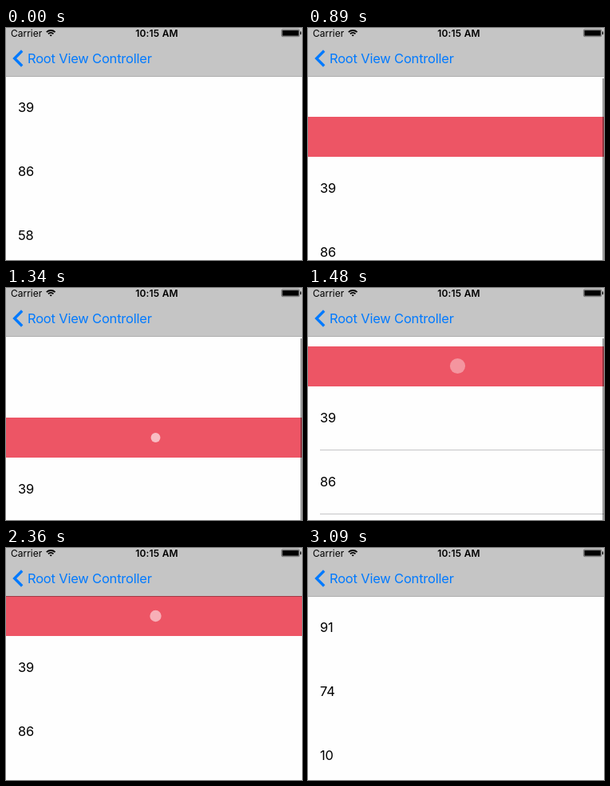
Recreate the animation shown at these times as an HTML page with a canvas. Size 371 px wide and 290 px high, loop 3350 ms.

```html
<!DOCTYPE html>
<html lang="en">
<head>
<meta charset="utf-8">
<title>Pull to refresh</title>
<style>
  html, body { margin: 0; width: 100%; height: 100%; overflow: hidden; background: #fefefe; }
  canvas { display: block; }
</style>
</head>
<body>
<canvas id="stage" width="371" height="290"></canvas>
<script>
const ctx = document.getElementById('stage').getContext('2d');
const LOOP = 3350, STEP = 147.6, LEAD = 10;
const WIDTH = 371, HEIGHT = 290, NAV = 60, ROW = 80, HEADER = 50;
const FONT = 'Inter, Roboto, sans-serif';
const BLUE = '#007aff';

// All times below count steps of the animation clock.
const RELEASE = 9, RELOAD = 19, MAX_PULL = 152;

const clamp = (x, min, max) => Math.min(Math.max(x, min), max);
const ease = p => (1 - Math.cos(Math.PI * clamp(p, 0, 1))) / 2;

// Distance the list is pulled down: steady drag with soft ends, spring to the header, close.
function pullAt(step) {
  if (step < RELEASE) {
    const finger = 50 * (step - 4) + 1;
    return (clamp(finger - 6, 0, MAX_PULL) + clamp(finger + 6, 0, MAX_PULL)) / 2;
  }
  if (step < RELOAD) {
    return HEADER + (MAX_PULL - HEADER) * Math.exp(-2.0975 * (step - RELEASE) ** 1.5);
  }
  return HEADER * (1 - ease((step - 18.86) / 2.23));
}

function rect(color, x, y, w, h) {
  ctx.fillStyle = color;
  ctx.fillRect(x, y, w, h);
}

function polyline(...points) {
  ctx.beginPath();
  points.forEach(([x, y]) => ctx.lineTo(x, y));
}

function text(str, x, y, { size = 16.5, weight = 400, color = '#000', spacing = -0.2, align = 'left' } = {}) {
  ctx.font = `${weight} ${size}px ${FONT}`;
  ctx.letterSpacing = spacing + 'px';
  ctx.textAlign = align;
  ctx.fillStyle = color;
  ctx.fillText(str, x, y);
}

function drawList(pull, numbers) {
  // Hairlines are only seen when they fall on a whole pixel.
  const showLines = pull % 1 === 0.5;
  numbers.forEach((number, i) => {
    const top = NAV + pull + i * ROW;
    text(number, 15, Math.round(top + 45));
    if (showLines) rect('#c4c4c6', 15, Math.floor(top + ROW), WIDTH - 15, 1);
  });
}

function drawHeader(pull, step) {
  if (pull === 0) return;
  rect('#ed5565', 0, Math.round(NAV + pull) - HEADER, WIDTH, HEADER);
  if (step >= RELEASE && step < RELOAD) drawPulse(NAV + pull - HEADER / 2, step);
}

// A dot that grows while it fades, over and over.
function drawPulse(y, step) {
  const size = ease(((step - 6.27) % 6.67) / 6.1);
  if (size > 0.95) return;
  ctx.fillStyle = `rgba(255,255,255,${1 - 0.93 * size})`;
  ctx.beginPath();
  ctx.arc(187.5, y, 14.25 * size, 0, 2 * Math.PI);
  ctx.fill();
}

function drawWifi(x, y) {
  ctx.strokeStyle = ctx.fillStyle = '#000';
  ctx.lineWidth = 1.8;
  for (const radius of [1.3, 4.6, 7.6]) {
    ctx.beginPath();
    ctx.arc(x, y, radius, -Math.PI * 0.75, -Math.PI * 0.25);
    ctx.stroke();
  }
}

function drawBattery() {
  ctx.strokeStyle = 'rgba(0,0,0,.6)';
  ctx.lineWidth = 0.7;
  ctx.beginPath();
  ctx.roundRect(345.4, 1.9, 22.4, 8.8, 1.5);
  ctx.stroke();
  rect('#000', 346.4, 2.9, 20.4, 6.8);
  rect('#000', 368.8, 4.5, 1.2, 3.6);
}

function drawNav() {
  rect('#c5c5c5', 0, 0, WIDTH, NAV);
  rect('rgba(0,0,0,.32)', 0, NAV, WIDTH, 1);
  text('Carrier', 6, 11, { size: 12, spacing: 0 });
  text('10:15 AM', 189, 11, { size: 12, weight: 600, spacing: 0.2, align: 'center' });
  drawWifi(56.2, 10.6);
  drawBattery();
  ctx.strokeStyle = BLUE;
  ctx.lineWidth = 3.4;
  polyline([20.2, 28.5], [10.7, 38], [20.2, 47.5]);
  ctx.stroke();
  text('Root View Controller', 27, 44, { color: BLUE });
}

// The pointer swings up along an arc, then starts to drag down.
function drawPointer(step) {
  if (step < 1 || step > 5) return;
  ctx.save();
  ctx.translate(Math.round(170 + 21 * ease((step - 1.6) / 1.4)), Math.round(72 + 17 * (step - 2.9) ** 2));
  polyline([0.7, 0], [0.7, 13.5], [3.8, 10.7], [6, 15.8], [8.2, 14.9], [6, 9.8], [10.2, 9.8]);
  ctx.closePath();
  ctx.shadowColor = 'rgba(0,0,0,.3)';
  ctx.shadowBlur = 2;
  ctx.shadowOffsetY = 1;
  ctx.strokeStyle = '#fff';
  ctx.lineWidth = 2;
  ctx.stroke();
  ctx.shadowColor = 'transparent';
  ctx.fillStyle = '#000';
  ctx.fill();
  ctx.restore();
}

function draw(step) {
  const pull = Math.floor(pullAt(step) * 2) / 2;
  rect('#fefefe', 0, 0, WIDTH, HEIGHT);
  drawList(pull, step < RELOAD ? [39, 86, 58] : [91, 74, 10]);
  drawHeader(pull, step);
  const scrolling = step >= 4 && step <= RELEASE + 1;
  if (scrolling) rect('rgba(0,0,0,.38)', 369, 63, 2, HEIGHT - 63);
  drawNav();
  drawPointer(step);
}

function frame() {
  const now = performance.now() % LOOP;
  draw(Math.min(Math.floor((now + LEAD) / STEP), 21));
  requestAnimationFrame(frame);
}
frame();
</script>
</body>
</html>
```
